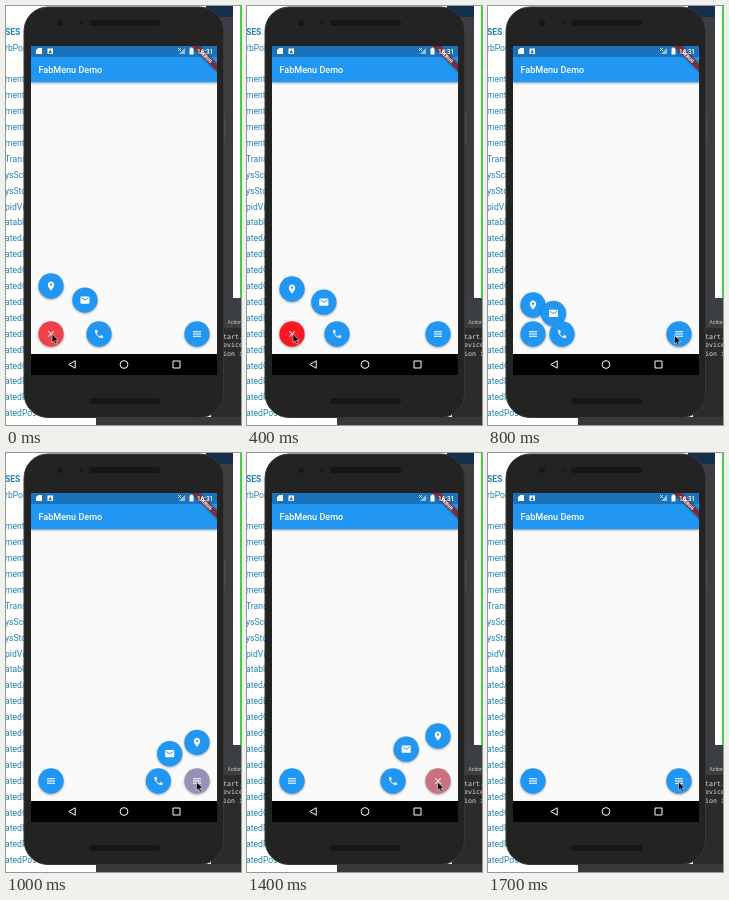
These frames come from a looping animation (235x419 px, 1800 ms). An HTML page:

```html
<!DOCTYPE html>
<html lang="en">
<head>
<meta charset="utf-8">
<style>
html, body { margin: 0; width: 100%; height: 100%; overflow: hidden; background: #fff; }
svg { display: block; width: 100vw; height: 100vh; font-family: Roboto, sans-serif; }
.shadow { filter: drop-shadow(0 1px 1.2px #0005); }
.mono { font: 6.6px "DejaVu Sans Mono", monospace; fill: #ddd; }
</style>
</head>
<body>
<svg viewBox="0 0 235 419">
  <defs>
    <path id="menu" d="M3 18h18v-2H3zm0-5h18v-2H3zm0-7v2h18V6z"/>
    <path id="close" d="M19 6.4 17.6 5 12 10.6 6.4 5 5 6.4l5.6 5.6L5 17.6 6.4 19l5.6-5.6 5.6 5.6 1.4-1.4-5.6-5.6z" opacity=".85"/>
    <path id="pin" d="M12 2C8.13 2 5 5.13 5 9c0 5.25 7 13 7 13s7-7.75 7-13c0-3.87-3.13-7-7-7zm0 9.5a2.5 2.5 0 1 1 0-5 2.5 2.5 0 0 1 0 5z"/>
    <path id="mail" d="M20 4H4a2 2 0 0 0-2 2v12a2 2 0 0 0 2 2h16a2 2 0 0 0 2-2V6a2 2 0 0 0-2-2zm0 4-8 5-8-5V6l8 5 8-5z"/>
    <path id="phone" d="M6.6 10.8c1.5 2.8 3.8 5.1 6.6 6.6l2.2-2.2a1 1 0 0 1 1-.25c1.1.37 2.3.57 3.6.57a1 1 0 0 1 1 1V20a1 1 0 0 1-1 1A17 17 0 0 1 3 4a1 1 0 0 1 1-1h3.5a1 1 0 0 1 1 1c0 1.25.2 2.45.57 3.57a1 1 0 0 1-.25 1z"/>
    <clipPath id="screen"><path d="M25 40h186v329H25z"/></clipPath>
  </defs>

  <!-- desktop behind the device -->
  <g id="list" font-size="8.6" fill="#2383b0"></g>
  <path d="M200 0h27v292h-27z" fill="#3b3d40"/>
  <path d="M200 0h27v11h-27z" fill="#142f4c"/>
  <path d="M205 292h30v30h-30z" fill="#3c3f41"/>
  <path d="M205 322h30v90h-30z" fill="#2b2b2b"/>
  <path d="M90 411h145v8H90z" fill="#383838"/>
  <text x="221.5" y="318" font-size="5" fill="#ccc">Action</text>
  <g class="mono"><text x="217" y="332.500">tart.</text><text x="217" y="341">evice</text><text x="217" y="349.500">ion i</text></g>
  <path d="M234.500 0v292" stroke="#0f0"/>

  <!-- device -->
  <path d="M217 107h2.300v30H217z" fill="#4a4a4c"/>
  <rect x="18" y="1" width="199.500" height="410.500" rx="24" fill="#232324" stroke="#38383a"/>
  <g fill="#161617">
    <rect x="83" y="14" width="71" height="6" rx="3"/><rect x="83" y="392" width="71" height="6" rx="3"/>
    <circle cx="54" cy="17" r="3"/><circle cx="75" cy="17" r="1.300"/>
  </g>
  <g clip-path="url(#screen)">
    <path d="M25 40h186v329H25z" fill="#fafafa"/>
    <path d="M25 50h186v26.200H25z" fill="#2196f3" class="shadow"/>
    <path d="M25 40h186v10.900H25z" fill="#1a73ba"/>
    <path d="M25 348h186v21H25z"/>
    <g transform="translate(211 40) rotate(45)">
      <path d="M-25 12.700h50v5.400h-50z" fill="#792d3c" style="filter:drop-shadow(0 0 1px #0008)"/>
      <text y="17.100" font-size="4.600" font-weight="900" text-anchor="middle" fill="#fff">DEBUG</text>
    </g>
    <g fill="#fff">
      <path d="M32.500 42h3.500v6h-6v-4zM41.500 42.500h5.500v5.500h-5.500z"/>
      <path d="m44.200 43.300 1.700 4h-3.400z" fill="#1a73ba"/>
      <path d="M179 42v6h-6z" opacity=".55"/><path d="m172 42 3 3m0-3-3 3" stroke="#fff" stroke-width=".7"/>
      <path d="M183.500 42.500h1v-1h2v1h1v6h-4z"/>
      <text x="191" y="47.800" font-size="6.400" font-weight="500">16:31</text>
      <text x="32.500" y="66.800" font-size="9.050" font-weight="500">FabMenu Demo</text>
    </g>
    <g fill="none" stroke="#fff">
      <path d="m62.800 358.500 6.400-3.700v7.400zM167 355h7v7h-7z"/><circle cx="118" cy="358.500" r="3.900"/>
    </g>
    <g id="fabs"></g>
  </g>
  <path id="cursor" d="M0 0v8.500l2-1.800 1.500 3.400 1.500-.700-1.500-3.200h2.800z" stroke="#fff" stroke-width=".5"/>
</svg>
<script>
const $ = id => document.getElementById(id);
const LOOP = 1800, STEP = 100, BASE_Y = 328, ICON_SCALE = 0.4526;
const BLUE = [33, 150, 243], RED = [244, 67, 54];

const row = (text, y, weight = 400) => `<text x="-1" y="${y}" font-weight="${weight}">${text}</text>`;
const names = "ments ments ments ments ments Trans ysScr ysSto pidVie atabl atedA atedB atedC atedC atedD atedI atedL atedM atedO atedP atedP atedPos";
$("list").innerHTML = row("SES", 29, 700) + row("rbPoi", 44.5) +
  names.split(" ").map((name, i) => row(name, 76.3 + i * 15.9)).join("");

// Keys are [time, ...values], interpolated linearly.
function at(keys, t) {
  const next = keys.findIndex(key => key[0] > t);
  if (next < 0) return keys.at(-1).slice(1);
  if (!next) return keys[0].slice(1);
  const a = keys[next - 1], b = keys[next], k = (t - a[0]) / (b[0] - a[0]);
  return a.slice(1).map((v, i) => v + (b[i + 1] - v) * k);
}

const menus = [
  {
    x: 45, dir: 1, crossed: [0, 400],
    spread: [[0, 48], [200, 45], [400, 45], [600, 46], [700, 41], [800, 29], [900, 11], [1000, 0]],
    color: [[0, 238, 65, 72], [400, 252, 24, 34], [600, ...BLUE]]
  },
  {
    x: 191, dir: -1, crossed: [1100, 1400],
    spread: [[900, 0], [1000, 38.6], [1100, 48], [1300, 45], [1400, 45], [1500, 46], [1600, 29], [1700, 0]],
    color: [[800, ...BLUE], [1000, 151, 145, 183], [1200, ...RED], [1300, ...RED], [1400, 203, 113, 125], [1600, ...BLUE]]
  }
];
const pointer = [[400, 46, 328], [600, 128, 326], [800, 186.5, 329.5], [1000, 190.5, 329]];

const fab = (icon, x, y, color = BLUE) => `<g transform="translate(${x} ${y})">
  <circle class="shadow" r="12.67" fill="rgb(${color})"/>
  <use href="#${icon}" fill="#fff" transform="scale(${ICON_SCALE}) translate(-12 -12)"/></g>`;

function drawMenu({ x, dir, crossed, spread, color }, t) {
  const [d] = at(spread, t), diagonal = d * Math.SQRT1_2;
  const items = d > 0
    ? fab("pin", x, BASE_Y - d) + fab("mail", x + dir * diagonal, BASE_Y - diagonal) + fab("phone", x + dir * d, BASE_Y)
    : "";
  const icon = t >= crossed[0] && t <= crossed[1] ? "close" : "menu";
  return items + fab(icon, x, BASE_Y, at(color, t));
}

function frame() {
  const t = Math.floor(performance.now() % LOOP / STEP) * STEP;
  $("fabs").innerHTML = menus.map(menu => drawMenu(menu, t)).join("");
  $("cursor").setAttribute("transform", `translate(${at(pointer, t)})`);
  requestAnimationFrame(frame);
}
frame();
</script>
</body>
</html>
```
